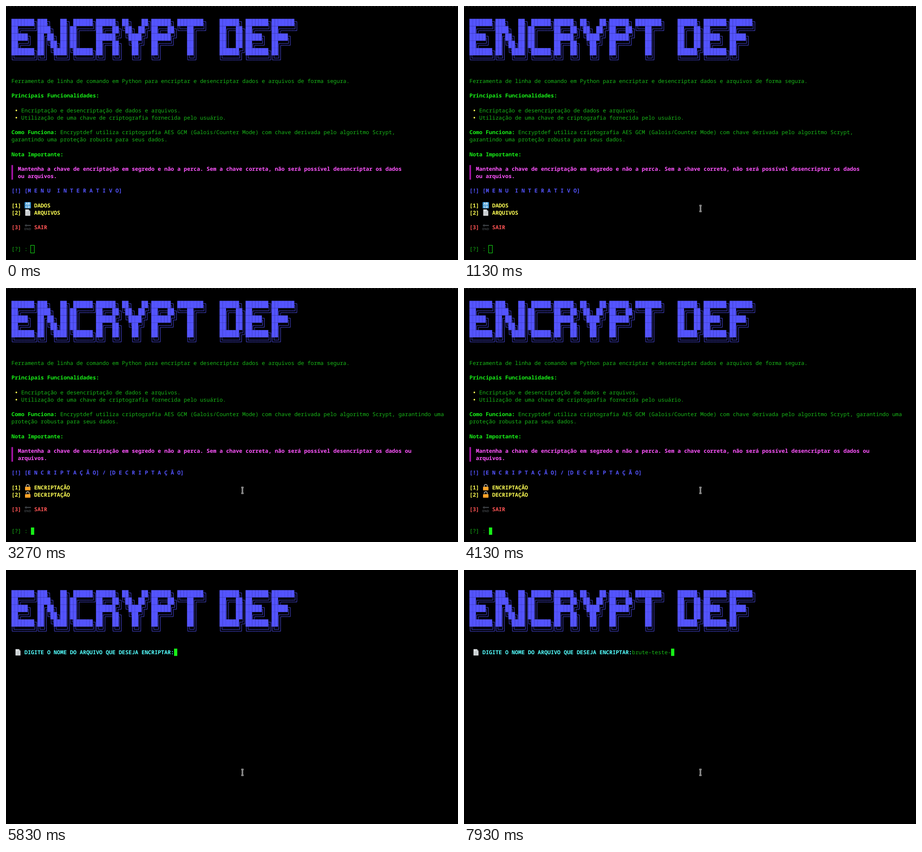
Recreate the animation shown at these times as an HTML page with a canvas. Size 998 by 561 pixels, loop 8 s.

```html
<!DOCTYPE html>
<html lang="pt">
<head>
<meta charset="utf-8">
<title>Encrypt Def</title>
<style>
html, body { margin: 0; width: 100%; height: 100%; overflow: hidden; background: #000; }
canvas { display: block; }
</style>
</head>
<body>
<canvas id="stage" width="998" height="561"></canvas>
<script>
const ctx = document.getElementById('stage').getContext('2d');
const LOOP = 8000, CELL = 7.18, LINE = 16.15, LEFT = 12, TOP = -4;
const GREEN = '#18b818', BRIGHT = '#18f018', BLUE = '#5454ff', YELLOW = '#ffff54',
      RED = '#ff5454', PINK = '#ff54ff', CYAN = '#54ffff';

// Moments at which the terminal changes, in ms
const FOCUS = 1750, TYPE_TWO = 2030, SUBMENU = 2930, TYPE_ONE = 4650, ENTER = 5030, CLEAR = 5130;
const FILE_NAME = 'brute-teste-';
const KEY_TIMES = [6050, 6190, 6330, 6470, 6610, 6800, 6920, 7040, 7160, 7280, 7400, 7700];

const BANNER = [
  '███████╗███╗   ██╗ ██████╗██████╗ ██╗   ██╗██████╗ ████████╗    ██████╗ ███████╗███████╗',
  '██╔════╝████╗  ██║██╔════╝██╔══██╗╚██╗ ██╔╝██╔══██╗╚══██╔══╝    ██╔══██╗██╔════╝██╔════╝',
  '█████╗  ██╔██╗ ██║██║     ██████╔╝ ╚████╔╝ ██████╔╝   ██║       ██║  ██║█████╗  █████╗  ',
  '██╔══╝  ██║╚██╗██║██║     ██╔══██╗  ╚██╔╝  ██╔═══╝    ██║       ██║  ██║██╔══╝  ██╔══╝  ',
  '███████╗██║ ╚████║╚██████╗██║  ██║   ██║   ██║        ██║       ██████╔╝███████╗██║     ',
  '╚══════╝╚═╝  ╚═══╝ ╚═════╝╚═╝  ╚═╝   ╚═╝   ╚═╝        ╚═╝       ╚═════╝ ╚══════╝╚═╝     '
];
// Open sides of each corner: horizontal, vertical
const CORNERS = { '╗': [-1, 1], '╔': [1, 1], '╝': [-1, -1], '╚': [1, -1] };

const colX = col => LEFT + col * CELL;
const rowY = row => TOP + row * LINE;

function text(row, col, str, color, bold = false) {
  ctx.font = `${bold ? 'bold ' : ''}11.97px "Noto Sans Mono", monospace`;
  ctx.textRendering = 'geometricPrecision';
  ctx.textAlign = 'left';
  ctx.fillStyle = color;
  [...str].forEach((ch, i) => {
    if (ch !== ' ') ctx.fillText(ch, colX(col + i), rowY(row) + 12.5);
  });
}

function line(color, width, ...points) {
  ctx.strokeStyle = color;
  ctx.lineWidth = width;
  ctx.beginPath();
  points.forEach(([x, y]) => ctx.lineTo(x, y));
  ctx.stroke();
}

function boxGlyph(ch, x, y) {
  const w = CELL / 2, h = LINE / 2, gap = 2, cx = x + w, cy = y + h;
  const stroke = (...points) => line('#4a4ae0', 1, ...points);
  for (const d of [-gap, gap]) {
    if (ch === '═') stroke([x, cy + d], [x + CELL, cy + d]);
    else if (ch === '║') stroke([cx + d, y], [cx + d, y + LINE]);
    else {
      const [sx, sy] = CORNERS[ch];
      stroke([cx + sx * w, cy + sy * d], [cx + sx * d, cy + sy * d], [cx + sx * d, cy + sy * h]);
    }
  }
}

function banner(row) {
  BANNER.forEach((str, r) => [...str].forEach((ch, c) => {
    const x = colX(c), y = rowY(row + r);
    if (ch === '█') {
      ctx.fillStyle = BLUE;
      ctx.fillRect(x, y, CELL, LINE);
    } else if (ch !== ' ') boxGlyph(ch, x, y);
  }));
}

// Icons are drawn in a 14 by 14 box
const icons = {
  letters() {
    ctx.fillStyle = '#3b94d0';
    ctx.beginPath();
    ctx.roundRect(0, 0, 14, 14, 1.5);
    ctx.fill();
    ctx.fillStyle = '#fff';
    ctx.font = 'bold 7px "Open Sans", sans-serif';
    ctx.textAlign = 'center';
    ctx.fillText('AB', 7, 6.4);
    ctx.fillText('CD', 7, 12.9);
  },
  page() {
    ctx.fillStyle = '#dde0e2';
    ctx.beginPath();
    [[1.5, 0], [9, 0], [12.5, 3.8], [12.5, 14], [1.5, 14]].forEach(p => ctx.lineTo(...p));
    ctx.fill();
    ctx.fillStyle = '#a4acb0';
    ctx.fillRect(9, 0.5, 1, 3.5);
    ctx.fillRect(9, 3.3, 3.5, 1);
    for (let y = 5.2; y < 13; y += 2) ctx.fillRect(3, y, 8, 0.7);
  },
  end() {
    ctx.fillStyle = '#3d4145';
    ctx.beginPath();
    [[0, 3.2], [4, 0], [4, 2], [14, 2], [14, 4.6], [4, 4.6], [4, 6.4]].forEach(p => ctx.lineTo(...p));
    ctx.fill();
    ctx.font = 'bold 7px "Open Sans", sans-serif';
    ctx.textAlign = 'center';
    ctx.fillText('END', 7, 13.8);
  },
  lock(open = false) {
    ctx.strokeStyle = '#a9a59a';
    ctx.lineWidth = 1.8;
    ctx.beginPath();
    ctx.moveTo(3.6, open ? 5 : 7);
    ctx.lineTo(3.6, 4.2);
    ctx.arc(7, 4.2, 3.4, Math.PI, 0);
    ctx.lineTo(10.4, 7);
    ctx.stroke();
    ctx.fillStyle = '#ffa529';
    ctx.beginPath();
    ctx.roundRect(1, 6, 12, 8, 1.2);
    ctx.fill();
    ctx.fillStyle = '#c97a18';
    ctx.fillRect(2, 12, 10, 0.8);
  },
  unlock() { icons.lock(true); }
};

function icon(name, row, col) {
  ctx.save();
  ctx.translate(colX(col) + 0.3, rowY(row) + 1);
  icons[name]();
  ctx.restore();
}

function cursor(row, col, hollow = false) {
  if (hollow) {
    ctx.strokeStyle = BRIGHT;
    ctx.lineWidth = 1;
    ctx.strokeRect(Math.round(colX(col)) - 0.5, Math.round(rowY(row)) - 0.5, 8, 17);
  } else {
    ctx.fillStyle = BRIGHT;
    ctx.fillRect(colX(col), rowY(row), CELL, LINE);
  }
}

function option(row, number, iconName, label, color = YELLOW) {
  text(row, 0, `[${number}]`, color, true);
  icon(iconName, row, 4);
  text(row, 7, label, color, true);
}

function menuScreen(sub, typed, scroll) {
  const at = row => row - scroll;
  ctx.fillStyle = '#303030';
  for (let x = 0.5; x < 998; x += CELL) ctx.fillRect(x, 1, 4.6, 1);

  banner(at(2));
  text(at(10), 0, 'Ferramenta de linha de comando em Python para encriptar e desencriptar dados e arquivos de forma segura.', GREEN);
  text(at(12), 0, 'Principais Funcionalidades:', BRIGHT, true);
  ['Encriptação e desencriptação de dados e arquivos.',
   'Utilização de uma chave de criptografia fornecida pelo usuário.'].forEach((str, i) => {
    text(at(14 + i), 1, '•', YELLOW, true);
    text(at(14 + i), 3, str, GREEN);
  });
  text(at(17), 0, 'Como Funciona:', BRIGHT, true);
  text(at(17), 15, 'Encryptdef utiliza criptografia AES GCM (Galois/Counter Mode) com chave derivada pelo algoritmo Scrypt,' +
    (sub ? ' garantindo uma' : ''), GREEN);
  text(at(18), 0, (sub ? '' : 'garantindo uma ') + 'proteção robusta para seus dados.', GREEN);
  text(at(20), 0, 'Nota Importante:', BRIGHT, true);

  ctx.fillStyle = '#a814a8';
  ctx.fillRect(LEFT, rowY(at(22)), 3.5, LINE * 2);
  text(at(22), 2, 'Mantenha a chave de encriptação em segredo e não a perca. Sem a chave correta, não será possível desencriptar os dados' +
    (sub ? ' ou' : ''), PINK, true);
  text(at(23), 2, (sub ? '' : 'ou ') + 'arquivos.', PINK, true);

  text(at(25), 0, sub ? '[!] [E N C R I P T A Ç Ã O] / [D E C R I P T A Ç Ã O]'
                      : '[!] [M E N U  I N T E R A T I V O]', BLUE, true);
  option(at(27), 1, sub ? 'lock' : 'letters', sub ? 'ENCRIPTAÇÃO' : 'DADOS');
  option(at(28), 2, sub ? 'unlock' : 'page', sub ? 'DECRIPTAÇÃO' : 'ARQUIVOS');
  option(at(30), 3, 'end', 'SAIR', RED);
  text(at(33), 0, '[?] : ' + typed, GREEN);
}

function fileScreen(t) {
  const count = KEY_TIMES.filter(k => t >= k).length;
  banner(3);
  icon('page', 11, 1);
  text(11, 4, 'DIGITE O NOME DO ARQUIVO QUE DESEJA ENCRIPTAR:', CYAN, true);
  text(11, 50, FILE_NAME.slice(0, count), GREEN);
  cursor(11, 50 + count);
}

// The pointer slides in from the bottom edge and settles
function pointer(t) {
  if (t < 620) return;
  const rest = (1 - Math.min((t - 620) / 580, 1)) ** 3;
  const x = 522 + 110 * rest, y = 447 + 122 * rest;
  for (const [color, width] of [['#d0d0d0', 3], ['#444', 1]]) {
    line(color, width, [x, y - 6.5], [x, y + 6.5]);
    for (const d of [-6.5, 6.5]) line(color, width, [x - 3 + width / 6, y + d], [x + 3 - width / 6, y + d]);
  }
}

function draw(t) {
  ctx.fillStyle = '#000';
  ctx.fillRect(0, 0, 998, 561);
  if (t < CLEAR) {
    const sub = t >= SUBMENU, entered = t >= ENTER;
    const typed = sub ? (t >= TYPE_ONE ? '1' : '') : (t >= TYPE_TWO ? '2' : '');
    menuScreen(sub, typed, entered ? 1 : 0);
    cursor(33, entered ? 0 : 6 + typed.length, t < FOCUS);
  } else fileScreen(t);
  pointer(t);
}

const start = performance.now();
function tick() {
  draw((performance.now() - start) % LOOP);
  requestAnimationFrame(tick);
}
tick();
</script>
</body>
</html>
```
